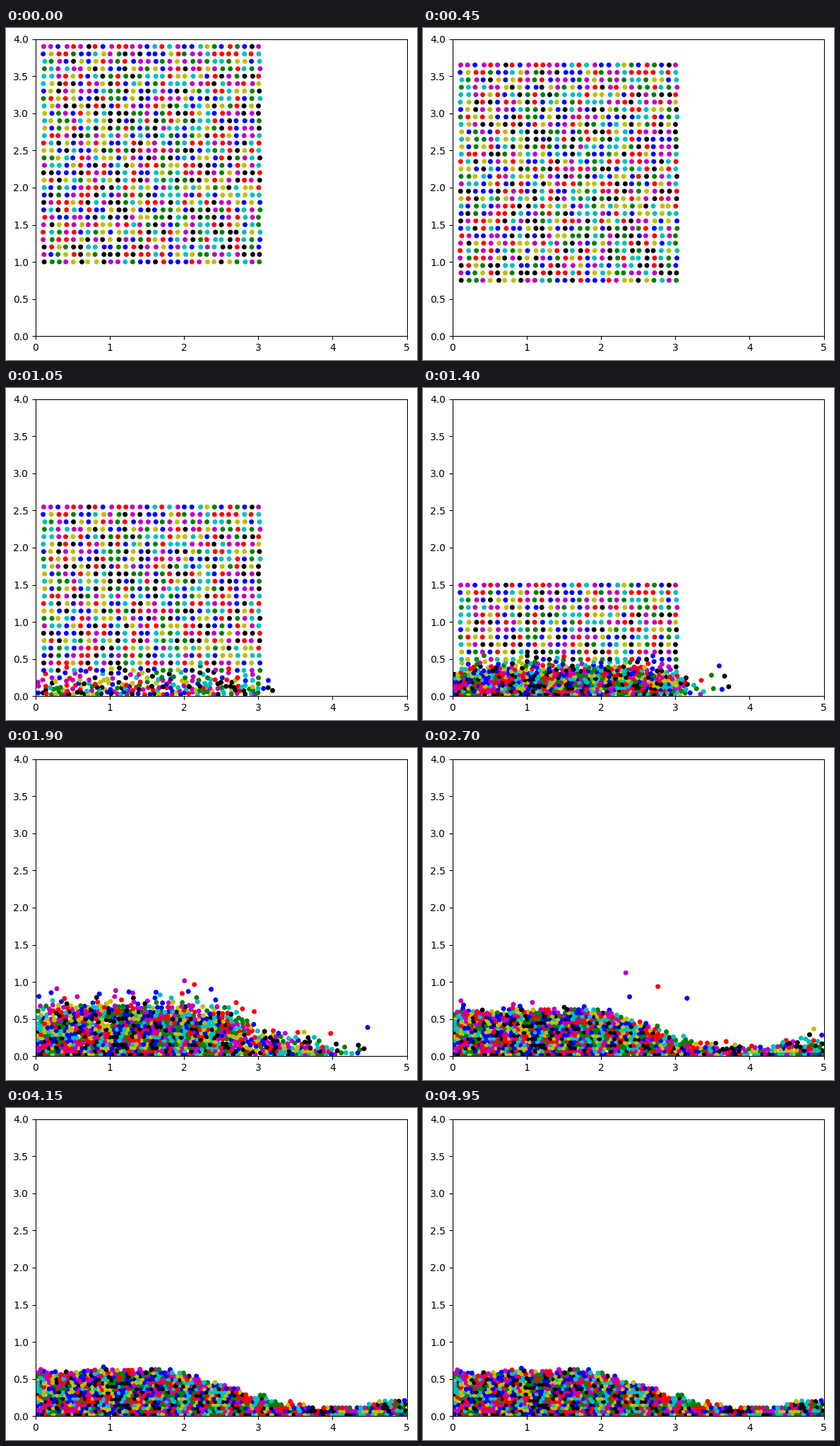
A matplotlib script for the animation above (5 s loop, 582 by 470 pixels).

```python
import numpy as np
import matplotlib.pyplot as plt
from matplotlib.animation import FuncAnimation

WIDTH, HEIGHT, DPI = 582, 470, 100
FRAMES, INTERVAL = 100, 50
FRAME_TIME = 0.025          # simulated seconds per frame
SUBSTEPS = 50
DT = FRAME_TIME / SUBSTEPS

SIDE = 30                   # grains per row and per column
COUNT = SIDE * SIDE
BOX = 5.0
RADIUS = 0.025
REACH = 0.095               # neighbour search distance
REBUILD = 10                # steps between neighbour searches

GRAVITY = 9.81
STIFFNESS = 2.0e5
DAMPING = 150.0
SOFT_SPEED = 0.6            # damping levels off above this speed
DRAG = 200.0
FRICTION = 0.25

rng = np.random.default_rng(7)


def starting_grid():
    """Grains as complex numbers x + iy, row by row, with a slight x jitter."""
    step = 0.1 * np.arange(SIDE)
    x, y = np.meshgrid(0.1 + step, 1.0 + step)
    return (x + rng.uniform(0, 0.025, x.shape) + 1j * y).ravel()


def neighbours(pos):
    """Index pairs of grains closer than REACH, found by sweeping along x."""
    order = np.argsort(pos.real)
    xs = pos.real[order]
    rank = np.arange(COUNT)
    span = (np.searchsorted(xs, xs + REACH) - rank).max()
    first, shift = np.meshgrid(rank, np.arange(1, max(span, 2)))
    second = first + shift
    inside = second < COUNT
    i, j = order[first[inside]], order[second[inside]]
    near = np.abs(pos[j] - pos[i]) < REACH
    return i[near], j[near]


def contact(overlap, rel, normal):
    """Force of a damped, frictional contact lying in direction normal."""
    local = rel * np.conj(normal)
    speed = local.real
    damping = DAMPING * speed / (1 + np.abs(speed) / SOFT_SPEED)
    push = np.maximum(STIFFNESS * overlap - damping, 0)
    limit = FRICTION * push
    slide = np.clip(DRAG * local.imag, -limit, limit)
    return (-push + 1j * slide) * normal


def gather(index, force):
    return (np.bincount(index, force.real, COUNT)
            + 1j * np.bincount(index, force.imag, COUNT))


def acceleration(pos, vel, pairs):
    acc = np.full(COUNT, -1j * GRAVITY)

    i, j = pairs
    gap = pos[j] - pos[i]
    dist = np.abs(gap)
    hit = dist < 2 * RADIUS
    if hit.any():
        i, j, gap, dist = i[hit], j[hit], gap[hit], dist[hit]
        force = contact(2 * RADIUS - dist, vel[j] - vel[i], gap / dist)
        acc += gather(i, force) - gather(j, force)

    walls = ((pos.imag, -1j), (pos.real, -1), (BOX - pos.real, 1))
    for room, normal in walls:
        hit = room < RADIUS
        acc[hit] += contact(RADIUS - room[hit], -vel[hit], normal)
    return acc


def simulate():
    pos = starting_grid()
    vel = np.zeros(COUNT, complex)
    history = [pos.copy()]
    for step in range((FRAMES - 1) * SUBSTEPS):
        if step % REBUILD == 0:
            pairs = neighbours(pos)
        vel += DT * acceleration(pos, vel, pairs)
        pos += DT * vel
        if (step + 1) % SUBSTEPS == 0:
            history.append(pos.copy())
    return history


history = simulate()
colors = rng.choice(list("bgrcmyk"), COUNT)

fig, ax = plt.subplots(figsize=(WIDTH / DPI, HEIGHT / DPI), dpi=DPI)
fig.subplots_adjust(left=42 / WIDTH, right=567.6 / WIDTH,
                    bottom=33.8 / HEIGHT, top=454.3 / HEIGHT)
ax.set_xlim(0, BOX)
ax.set_ylim(0, 4)
grains = ax.scatter(np.zeros(COUNT), np.zeros(COUNT),
                    s=16, linewidths=1, c=colors)


def draw(frame):
    pos = history[frame]
    grains.set_offsets(np.column_stack([pos.real, pos.imag]))
    return grains,


anim = FuncAnimation(fig, draw, frames=FRAMES, interval=INTERVAL, repeat=True)
plt.show()
```
